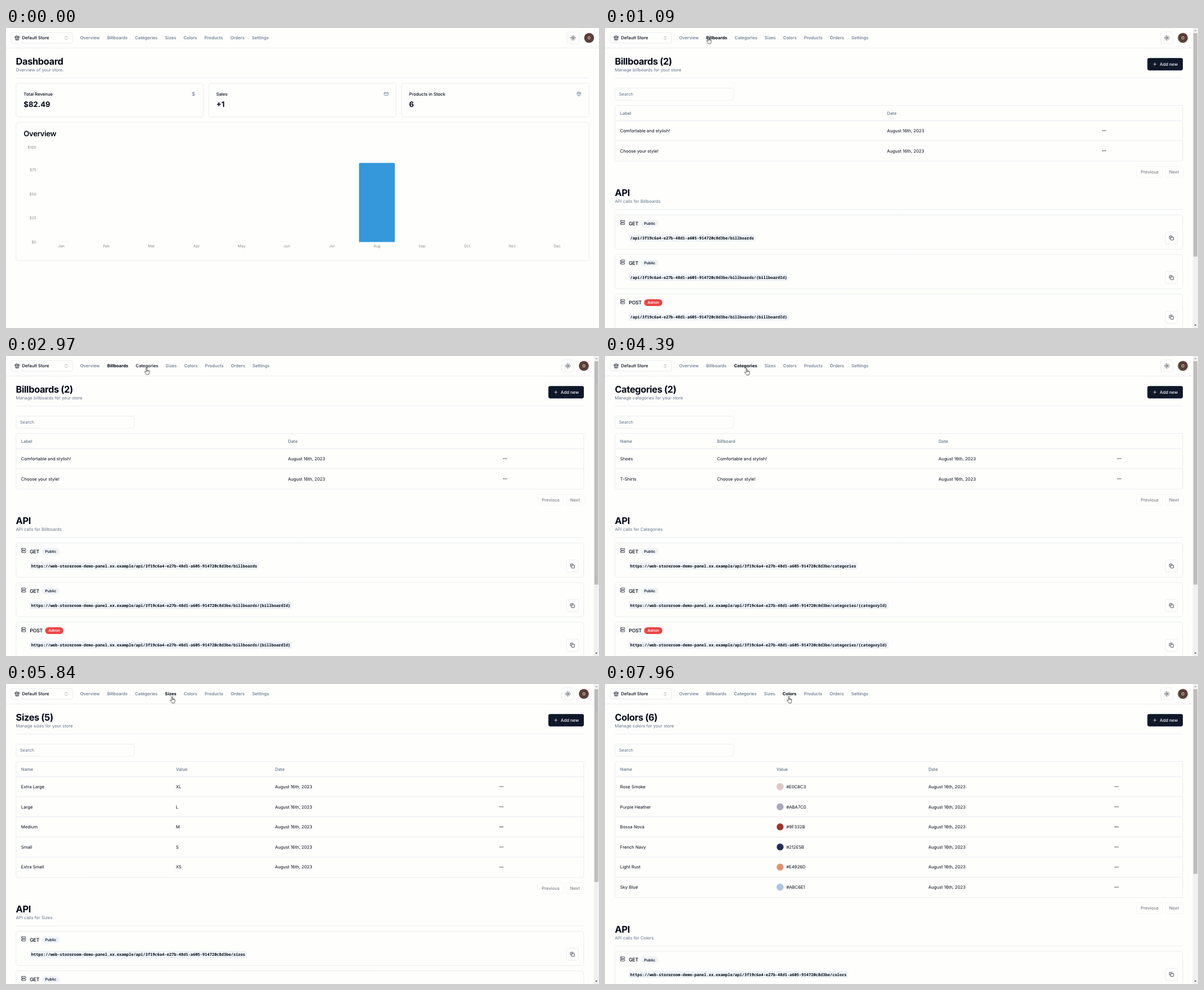
Animation, 1053 px wide and 532 px high, one loop 7.99 s. Source, as an HTML page with a canvas:

```html
<!DOCTYPE html>
<html lang="en">
<head>
<meta charset="utf-8">
<title>Store admin</title>
<style>
  html, body { margin: 0; width: 100%; height: 100%; overflow: hidden; background: #fefefc; }
  canvas { display: block; width: 1053px; height: 532px; }
</style>
</head>
<body>
<canvas id="stage"></canvas>
<script>
const LOOP = 7990, W = 1053, H = 532;
const S = W / 1920;               // layout is written for a 1920px wide window
const canvas = document.getElementById('stage');
const ctx = canvas.getContext('2d');
const dpr = window.devicePixelRatio || 1;
canvas.width = W * dpr;
canvas.height = H * dpr;

const BG = '#fefefc', INK = '#020817', MUTED = '#64748b', LINE = '#dfe4ee', SOFT = '#eff3f8', NAVY = '#0f172a';
const SANS = 'Inter, sans-serif', MONO = '"Noto Sans Mono", monospace';
const ORIGIN = 'https://web-storeroom-demo-panel.xx.example';
const STORE_ID = '3f19c6a4-e27b-48d1-a605-914720c8d3be';
const DATE = 'August 16th, 2023';

const ICONS = {
  store: 'M2 7l4.4-4.4A2 2 0 0 1 7.8 2h8.4a2 2 0 0 1 1.4.6L22 7M4 12v8a2 2 0 0 0 2 2h12a2 2 0 0 0 2-2v-8M15 22v-4a2 2 0 0 0-2-2h-2a2 2 0 0 0-2 2v4M2 7h20M2 7v3c0 2.7 5 2.7 5 0 0 2.7 5 2.7 5 0 0 2.7 5 2.7 5 0 0 2.7 5 2.7 5 0V7',
  sort: 'M7 15l5 5 5-5M7 9l5-5 5 5',
  sun: 'M16 12a4 4 0 1 1-8 0a4 4 0 1 1 8 0M12 2v2M12 20v2M4.9 4.9l1.4 1.4M17.7 17.7l1.4 1.4M2 12h2M20 12h2M6.3 17.7l-1.4 1.4M19.1 4.9l-1.4 1.4',
  dollar: 'M12 2v20M17 5H9.5a3.5 3.5 0 0 0 0 7h5a3.5 3.5 0 0 1 0 7H6',
  card: 'M4 5h16a2 2 0 0 1 2 2v10a2 2 0 0 1-2 2H4a2 2 0 0 1-2-2V7a2 2 0 0 1 2-2zM2 10h20',
  box: 'M16.5 9.4l-9-5.2M21 8v8a2 2 0 0 1-1 1.7l-7 4a2 2 0 0 1-2 0l-7-4A2 2 0 0 1 3 16V8a2 2 0 0 1 1-1.7l7-4a2 2 0 0 1 2 0l7 4A2 2 0 0 1 21 8zM3.3 7l8.7 5 8.7-5M12 22V12',
  plus: 'M5 12h14M12 5v14',
  server: 'M4 2h16a2 2 0 0 1 2 2v4a2 2 0 0 1-2 2H4a2 2 0 0 1-2-2V4a2 2 0 0 1 2-2zM4 14h16a2 2 0 0 1 2 2v4a2 2 0 0 1-2 2H4a2 2 0 0 1-2-2v-4a2 2 0 0 1 2-2zM6 6h.01M6 18h.01',
  copy: 'M10 8h10a2 2 0 0 1 2 2v10a2 2 0 0 1-2 2H10a2 2 0 0 1-2-2V10a2 2 0 0 1 2-2zM4 16c-1.1 0-2-.9-2-2V4c0-1.1.9-2 2-2h10c1.1 0 2 .9 2 2'
};
for (const name in ICONS) ICONS[name] = new Path2D(ICONS[name]);

const HAND = new Path2D('M6 1.5a1.5 1.5 0 0 1 3 0V8c.5-1 2.6-.8 2.8.4 .5-.8 2.4-.6 2.6.6 .6-.6 2.1-.2 2.1 1.1V15c0 3-1.5 4-1.5 6.5H7c0-2-4-5.5-5.5-8-1-1.7 1-2.7 2.2-1.5L6 14Z');
const FINGERS = new Path2D('M9 8v3.5M11.8 8.6v3M14.4 9.4v2.4');
const ARROW = new Path2D('M0 0V16.5L3.9 12.9L6.6 18.8L9 17.7L6.4 12H11.6Z');

const NAV = ['Overview', 'Billboards', 'Categories', 'Sizes', 'Colors', 'Products', 'Orders', 'Settings'];
// when a link is dark, by hover or by being the open page
const LIT = {
  Billboards: [760, 3720],
  Categories: [2230, 5680],
  Sizes: [4590, 7380],
  Colors: [6300, 9999]
};

const PAGES = [
  { at: 0 },
  {
    at: 1090, name: 'Billboards', one: 'billboard', dots: 1616, thumb: 739,
    cols: [['Label', 49], ['Date', 913]],
    rows: [['Comfortable and stylish!'], ['Choose your style!']]
  },
  {
    at: 3720, name: 'Categories', one: 'category', dots: 1665, thumb: 739,
    cols: [['Name', 49], ['Billboard', 363], ['Date', 1080]],
    rows: [['Shoes', 'Comfortable and stylish!'], ['T-Shirts', 'Choose your style!']]
  },
  {
    at: 5680, name: 'Sizes', one: 'size', dots: 1604, thumb: 640,
    cols: [['Name', 49], ['Value', 550], ['Date', 871]],
    rows: [['Extra Large', 'XL'], ['Large', 'L'], ['Medium', 'M'], ['Small', 'S'], ['Extra Small', 'XS']]
  },
  {
    at: 7380, name: 'Colors', one: 'color', dots: 1656, thumb: 614,
    cols: [['Name', 49], ['Value', 555], ['Date', 1047]],
    rows: [['Rose Smoke', '#E0C8C3'], ['Purple Heather', '#ABA7C0'], ['Bossa Nova', '#9F332B'],
      ['French Navy', '#212E5B'], ['Light Rust', '#E4926D'], ['Sky Blue', '#ABC6E1']]
  }
];

// pointer tip: time, x, y in stage pixels
const PATH = [
  [140, 330, -6], [920, 184, 17], [960, 184, 17], [1090, 183.5, 16], [2020, 183.5, 16],
  [2340, 249, 21], [2970, 249.5, 21], [3720, 249.5, 21], [3880, 251.5, 22], [4390, 251.5, 22],
  [4710, 295.5, 21.5], [5279, 295.5, 21.5], [5280, 295, 22], [6050, 295, 22], [6510, 325, 22],
  [7380, 325, 22], [7530, 326, 22], [7930, 326, 22], [7960, 326.5, 22]
];

const clamp = v => Math.max(0, Math.min(1, v));

function setFont(size, weight, family = SANS, track = 0) {
  ctx.font = `${weight} ${size}px ${family}`;
  ctx.letterSpacing = track * size + 'px';
}

function textWidth(str, size, weight, track = 0) {
  setFont(size, weight, SANS, track);
  return ctx.measureText(str).width;
}

// cy is the middle of the line box
function text(str, x, cy, { size = 14, weight = 400, color = INK, align = 'left', family = SANS, track = 0 } = {}) {
  setFont(size, weight, family, track);
  ctx.textAlign = align;
  ctx.fillStyle = color;
  ctx.fillText(str, x, cy + size * 0.364);
}

function fillBox(x, y, w, h, r, color) {
  ctx.fillStyle = color;
  ctx.beginPath();
  ctx.roundRect(x, y, w, h, r);
  ctx.fill();
}

function frameBox(x, y, w, h, r = 6) {
  ctx.strokeStyle = LINE;
  ctx.lineWidth = 1.2;
  ctx.beginPath();
  ctx.roundRect(x + 0.5, y + 0.5, w - 1, h - 1, r);
  ctx.stroke();
}

function rule(x, y, w) {
  ctx.fillStyle = LINE;
  ctx.fillRect(x, y, w, 1.2);
}

function disc(x, y, r, color) {
  ctx.fillStyle = color;
  ctx.beginPath();
  ctx.arc(x, y, r, 0, 7);
  ctx.fill();
}

function icon(name, cx, cy, color = INK, size = 16) {
  ctx.save();
  ctx.translate(cx - size / 2, cy - size / 2);
  ctx.scale(size / 24, size / 24);
  ctx.strokeStyle = color;
  ctx.lineWidth = 2;
  ctx.lineCap = ctx.lineJoin = 'round';
  ctx.stroke(ICONS[name]);
  ctx.restore();
}

function navColor(name, t) {
  const lit = LIT[name];
  const k = lit ? clamp((t - lit[0]) / 150) - clamp((t - lit[1]) / 150) : 0;
  const mix = (a, b) => Math.round(a + (b - a) * k);
  return `rgb(${mix(100, 2)},${mix(116, 8)},${mix(139, 23)})`;
}

// draws the top bar and returns the horizontal span of each link
function header(page, width, t) {
  frameBox(16, 14, 200, 36);
  icon('store', 36, 32);
  text('Default Store', 52, 32, { weight: 500 });
  icon('sort', 195, 32, '#7c808a');
  let x = 240;
  const spans = NAV.map(name => {
    const weight = name === page.name ? 700 : 500;
    const w = textWidth(name, 14, weight);
    text(name, x, 32, { weight, color: navColor(name, t) });
    const span = [x, x + w];
    x += w + 24;
    return span;
  });
  frameBox(width - 104, 12, 40, 40);
  icon('sun', width - 84, 32, INK, 19.2);
  disc(width - 32, 32, 16, '#5b3f36');
  text('O', width - 32, 32, { size: 13, weight: 500, color: '#f0e8e4', align: 'center' });
  rule(0, 64, width);
  return spans;
}

function heading(title, sub, y) {
  text(title, 32, y + 18, { size: 30, weight: 700, track: -0.025 });
  text(sub, 32, y + 46, { color: MUTED });
}

function dashboard() {
  heading('Dashboard', 'Overview of your store.', 89);
  rule(32, 161, 1856);
  const stats = [['Total Revenue', '$82.49', 'dollar'], ['Sales', '+1', 'card'], ['Products in Stock', '6', 'box']];
  stats.forEach(([label, value, mark], i) => {
    const x = 32 + i * 624;
    frameBox(x, 178, 608, 110, 8);
    text(label, x + 25, 213, { weight: 500 });
    text(value, x + 25, 247, { size: 24, weight: 700 });
    icon(mark, x + 575, 213, MUTED);
  });
  frameBox(32, 304, 1856, 449, 8);
  text('Overview', 57, 341, { size: 24, weight: 600, track: -0.025 });
  const tick = { size: 12, color: '#888888' };
  for (let v = 0; v <= 100; v += 25) {
    text('$' + v, 98, Math.max(386, 692 - v * 3.1), { ...tick, align: 'right' });
  }
  'Jan Feb Mar Apr May Jun Jul Aug Sep Oct Nov Dec'.split(' ').forEach((m, i) => {
    text(m, 179 + i * 146, 704.5, { ...tick, align: 'center' });
  });
  const bar = 82.49 * 3.1;
  fillBox(1143, 692 - bar, 116, bar, [4, 4, 0, 0], '#3498db');
}

function table(page) {
  const end = 301 + 65 * page.rows.length;
  frameBox(32, 250, 1839, end - 250);
  page.cols.forEach(([label, x]) => text(label, x, 275, { weight: 500, color: MUTED }));
  page.rows.forEach((row, i) => {
    const cy = 332 + 65 * i;
    rule(33, cy - 33, 1837);
    [...row, DATE].forEach((cell, c) => {
      let x = page.cols[c][1];
      if (cell[0] === '#') {
        disc(x + 12, cy, 12, LINE);
        disc(x + 12, cy, 11, cell);
        x += 32;
      }
      text(cell, x, cy);
    });
    for (const d of [-4.67, 0, 4.67]) disc(page.dots + d, cy, 1.4, INK);
  });
  return end;
}

function pager(y) {
  let right = 1871;
  for (const label of ['Next', 'Previous']) {
    const w = textWidth(label, 14, 500) + 26;
    ctx.globalAlpha = 0.5;
    frameBox(right - w, y, w, 36);
    text(label, right - w + 13, y + 18, { weight: 500 });
    ctx.globalAlpha = 1;
    right -= w + 8;
  }
}

function endpoint(y, verb, url) {
  const admin = verb !== 'GET';
  frameBox(32, y, 1839, 112, 8);
  icon('server', 57, y + 25);
  text(verb, 77, y + 28, { size: 16, weight: 500, track: -0.025 });
  const x = 77 + textWidth(verb, 16, 500, -0.025) + 8;
  const label = admin ? 'Admin' : 'Public';
  fillBox(x, y + 17, textWidth(label, 12, 600) + 22, 22, 11, admin ? '#ef4444' : SOFT);
  text(label, x + 11, y + 28, { size: 12, weight: 600, color: admin ? '#f8fafc' : NAVY });

  // 12.83px gives the 7.7px advance of the code font
  setFont(12.83, 600, MONO);
  fillBox(77, y + 63.5, ctx.measureText(url).width + 9.6, 23, 4, SOFT);
  text(url, 81.8, y + 75, { size: 12.83, weight: 600, family: MONO });
  frameBox(1814, y + 55, 40, 40);
  icon('copy', 1834, y + 75);
}

function scrollbar(end) {
  ctx.fillStyle = '#f1f1f1';
  ctx.fillRect(1903, 0, 17, 971);
  ctx.fillStyle = '#bdbdbd';
  ctx.fillRect(1905, 17, 13, end - 17);
  for (const [y, dir, color] of [[8, -1, '#a3a3a3'], [961, 1, '#505050']]) {
    ctx.fillStyle = color;
    ctx.beginPath();
    ctx.moveTo(1907.5, y - 2 * dir);
    ctx.lineTo(1915.5, y - 2 * dir);
    ctx.lineTo(1911.5, y + 2 * dir);
    ctx.fill();
  }
}

function listPage(page, t) {
  const path = page.name.toLowerCase();
  heading(`${page.name} (${page.rows.length})`, `Manage ${path} for your store`, 89);
  const w = textWidth('Add new', 14, 500) + 56;
  fillBox(1871 - w, 97, w, 40, 6, NAVY);
  icon('plus', 1895 - w, 117, '#f8fafc');
  text('Add new', 1911 - w, 117, { weight: 500, color: '#f8fafc' });
  rule(32, 161, 1839);
  frameBox(32, 194, 384, 40);
  text('Search', 45, 214, { color: MUTED });

  const end = table(page);
  pager(end + 16);
  heading('API', `API calls for ${page.name}`, end + 84);
  rule(32, end + 156, 1839);
  // the address gets its host one tick after the page opens
  const base = `${t >= page.at + 30 ? ORIGIN : ''}/api/${STORE_ID}/${path}`;
  const single = `${base}/{${page.one}Id}`;
  endpoint(end + 173, 'GET', base);
  endpoint(end + 301, 'GET', single);
  endpoint(end + 429, 'POST', single);
  scrollbar(page.thumb);
}

function pointerAt(t) {
  const i = PATH.findIndex(k => k[0] > t);
  if (i < 0) return PATH[PATH.length - 1].slice(1);
  const [t0, x0, y0] = PATH[i - 1], [t1, x1, y1] = PATH[i];
  const u = (t - t0) / (t1 - t0), k = u * u * (3 - 2 * u);
  return [x0 + (x1 - x0) * k, y0 + (y1 - y0) * k];
}

function pointer(t, spans) {
  if (t < PATH[0][0]) return;
  const [x, y] = pointerAt(t).map(v => v / S);
  const over = y > 22 && y < 42 && spans.some(([a, b]) => x >= a && x <= b);
  ctx.save();
  ctx.translate(over ? x - 7.5 : x, y);
  ctx.fillStyle = '#fff';
  ctx.strokeStyle = '#111';
  ctx.lineWidth = 1.2;
  ctx.lineJoin = 'round';
  ctx.fill(over ? HAND : ARROW);
  ctx.stroke(over ? HAND : ARROW);
  if (over) ctx.stroke(FINGERS);
  ctx.restore();
}

function draw(t) {
  const page = PAGES.filter(p => p.at <= t).pop();
  ctx.setTransform(dpr * S, 0, 0, dpr * S, 0, 0);
  ctx.textRendering = 'geometricPrecision';
  ctx.fillStyle = BG;
  ctx.fillRect(0, 0, 1921, 971);
  const spans = header(page, page.name ? 1903 : 1920, t);
  if (page.name) listPage(page, t);
  else dashboard();
  pointer(t, spans);
}

const start = performance.now();
function tick() {
  draw((performance.now() - start) % LOOP);
  requestAnimationFrame(tick);
}
tick();
</script>
</body>
</html>
```
